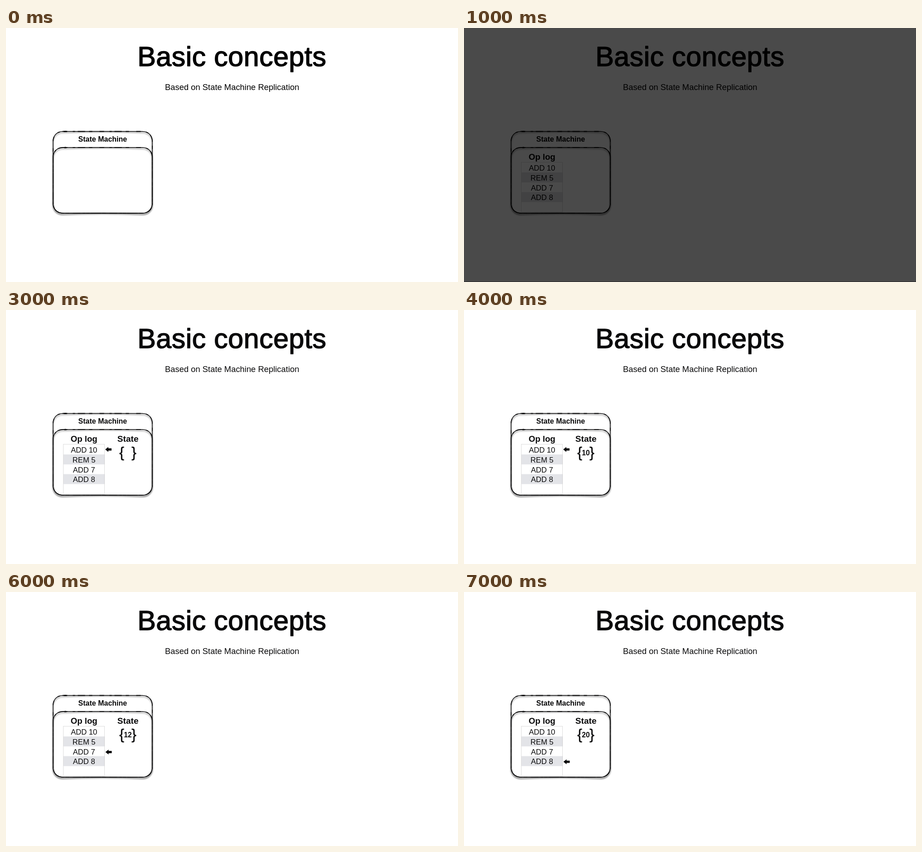
These frames come from a looping animation (998 px wide and 561 px high, 8000 ms). An HTML page with a canvas:

```html
<!DOCTYPE html>
<html lang="en">
<head>
<meta charset="utf-8">
<title>Basic concepts</title>
<style>
  html, body { margin: 0; width: 100%; height: 100%; overflow: hidden; background: #fff; }
  canvas { display: block; }
</style>
</head>
<body>
<canvas id="stage" width="998" height="561"></canvas>
<script>
const ctx = document.getElementById('stage').getContext('2d');
const W = 998, H = 561, STEP = 1000, STEPS = 8;
const LOG = ['ADD 10', 'REM 5', 'ADD 7', 'ADD 8'];
const BASELINES = [315.3, 336.6, 358.5, 380.4];
const ARROW_Y = [308, 330.5, 353.5, 375];
const BOX = { left: 104, right: 323, bottom: 409, radius: 22 };

// One entry per second: which log row the arrow marks, and the state value.
const ARROW_ROW = [-1, -1, -1, 0, 0, 1, 2, 3];
const VALUES = ['', '', '', '', '10', '5', '12', '20'];

let ink = '#000';

function text(str, x, y, size, weight = 'normal', outline = 0) {
  ctx.font = `${weight} ${size}px "Liberation Sans", Arial, sans-serif`;
  ctx.textAlign = 'center';
  ctx.fillStyle = ctx.strokeStyle = ink;
  ctx.fillText(str, x, y);
  if (outline) {
    ctx.lineWidth = outline;
    ctx.lineJoin = 'round';
    ctx.strokeText(str, x, y);
  }
}

// Rounded box whose top and bottom edges rise by `bow` in the middle.
function boxPath(top, bow) {
  const { left, right, bottom, radius: r } = BOX;
  const mid = (left + right) / 2;
  ctx.beginPath();
  ctx.moveTo(left + r, top);
  ctx.quadraticCurveTo(mid, top - bow * 2, right - r, top);
  ctx.bezierCurveTo(right - r * 0.4, top, right, top + r * 0.4, right, top + r);
  ctx.lineTo(right, bottom - r);
  ctx.bezierCurveTo(right, bottom - r * 0.4, right - r * 0.4, bottom, right - r, bottom);
  ctx.quadraticCurveTo(mid, bottom - bow * 2, left + r, bottom);
  ctx.bezierCurveTo(left + r * 0.4, bottom, left, bottom - r * 0.4, left, bottom - r);
  ctx.lineTo(left, top + r);
  ctx.bezierCurveTo(left, top + r * 0.4, left + r * 0.4, top, left + r, top);
  ctx.closePath();
}

function sketchBox(top) {
  ctx.save();
  ctx.filter = 'blur(1.8px)';
  ctx.translate(0, 3);
  ctx.strokeStyle = 'rgba(0,0,0,.36)';
  ctx.lineWidth = 2.2;
  boxPath(top, 2.2);
  ctx.stroke();
  ctx.restore();

  ctx.save();
  ctx.strokeStyle = ink;
  boxPath(top, 0);
  ctx.lineWidth = 1.4;
  ctx.stroke();
  // Uneven pen pressure
  ctx.lineCap = 'round';
  ctx.lineWidth = 1.8;
  ctx.setLineDash([9, 13, 4, 7, 15, 10, 6, 17]);
  ctx.stroke();
  ctx.restore();

  ctx.fillStyle = ink;
  ctx.beginPath();
  ctx.ellipse(131, top, 3.5, 1.6, 0, 0, Math.PI * 2);
  ctx.fill();
}

function drawTitle() {
  ctx.letterSpacing = '0.5px';
  text('Basic concepts', 498.8, 83.6, 61, 'normal', 1.5);
  ctx.letterSpacing = '0px';
  text('Based on State Machine Replication', 499.2, 136.6, 18.4);
}

function drawLog() {
  text('Op log', 172.2, 291, 18.6, 'bold');
  ctx.fillStyle = '#e3e4e8';
  ctx.fillRect(127, 319, 91, 22);
  ctx.fillRect(127, 362.5, 91, 22);
  ctx.save();
  ctx.strokeStyle = '#b9b9b9';
  ctx.lineWidth = 1;
  ctx.setLineDash([1, 1]);
  ctx.strokeRect(126.5, 296.5, 91, 110);
  ctx.restore();
  LOG.forEach((entry, i) => text(entry, 172.2, BASELINES[i], 16.6));
}

function drawState(value) {
  text('State', 269.2, 291, 19.1, 'bold');
  text('{', 255.6, 325, 31.5, 'normal', 0.6);
  text('}', 282.6, 325, 31.5, 'normal', 0.6);
  text(value, 269, 321.2, 15.6, 'bold');
}

function drawArrow(row) {
  const x = row < 2 ? 219 : 219.5, y = ARROW_Y[row];
  ctx.fillStyle = ink;
  ctx.beginPath();
  ctx.moveTo(x, y);
  ctx.lineTo(x + 7, y - 5.6);
  ctx.lineTo(x + 7, y - 2.5);
  ctx.lineTo(x + 14, y - 2.5);
  ctx.lineTo(x + 14, y + 2.5);
  ctx.lineTo(x + 7, y + 2.5);
  ctx.lineTo(x + 7, y + 5.6);
  ctx.closePath();
  ctx.fill();
}

function dim() {
  ctx.fillStyle = 'rgba(0,0,0,.71)';
  ctx.fillRect(0, 0, W, H);
  ctx.fillStyle = 'rgba(0,0,0,.45)';
  ctx.fillRect(0, H - 1, W, 1);
}

function draw(step) {
  ink = step < 2 ? '#000' : '#0a0a0b';
  ctx.fillStyle = '#fff';
  ctx.fillRect(0, 0, W, H);
  drawTitle();
  sketchBox(228.5);
  sketchBox(264);
  text('State Machine', 213.4, 251, 16, 'bold');
  if (step >= 1) drawLog();
  if (step >= 2) drawState(VALUES[step]);
  if (ARROW_ROW[step] >= 0) drawArrow(ARROW_ROW[step]);
  if (step === 1) dim();
}

const start = performance.now();
let shown = -1;

function tick() {
  const step = Math.floor((performance.now() - start) / STEP) % STEPS;
  if (step !== shown) draw(shown = step);
  requestAnimationFrame(tick);
}
tick();
</script>
</body>
</html>
```
